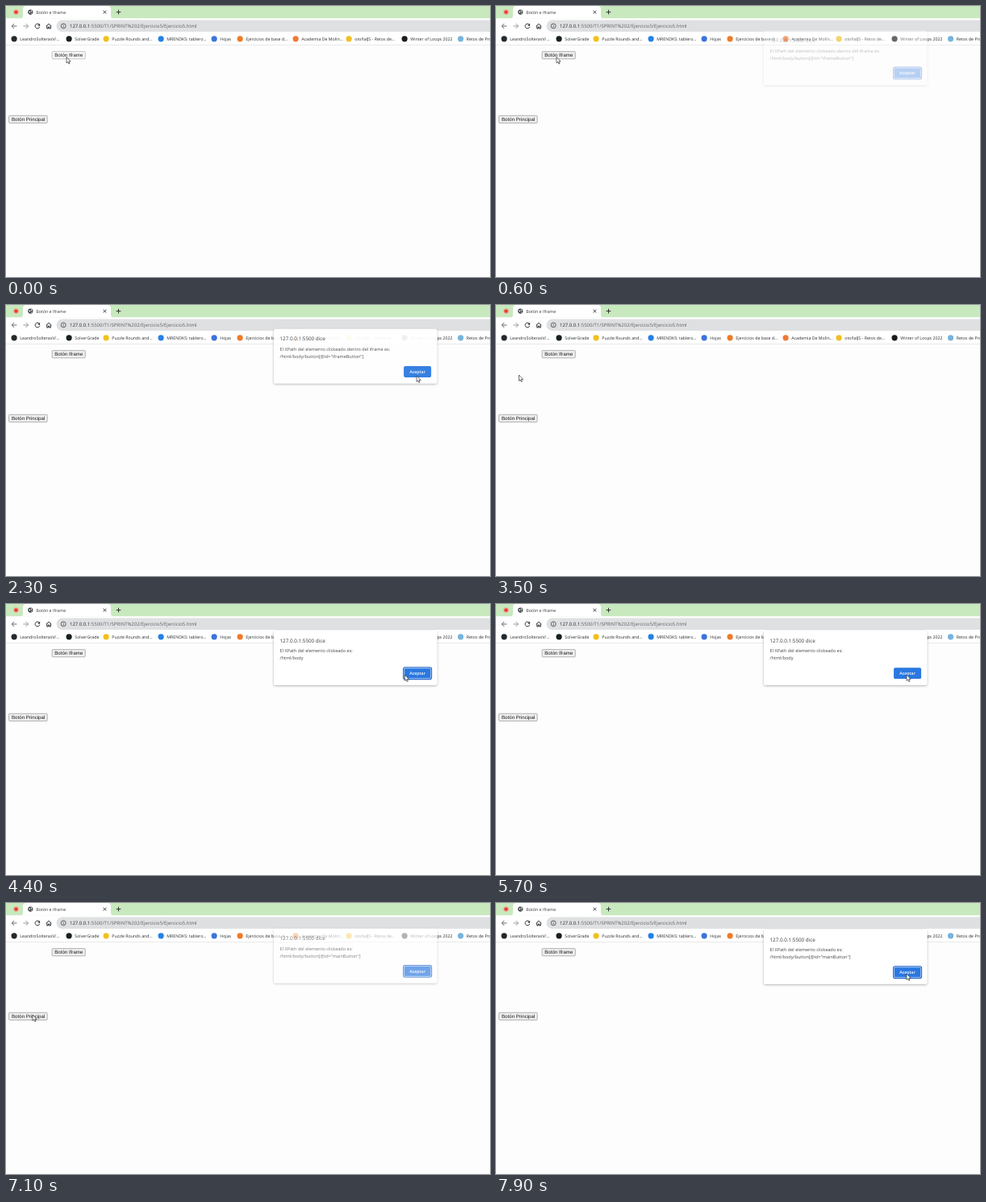
These frames come from a looping animation (600 px wide and 337 px high, 8000 ms). An HTML page:

```html
<!DOCTYPE html>
<html lang="es">
<head>
<meta charset="utf-8">
<title>Botón e Iframe</title>
<style>
html, body { margin: 0; width: 100%; height: 100%; overflow: hidden; background: #fefdfe; }
svg { display: block; width: 100vw; height: 100vh; }
text { font-family: "Open Sans", "Noto Sans", sans-serif; fill: #34373a; white-space: pre; text-rendering: geometricPrecision; }
.mark { font-size: 5.25px; fill: #26292c; }
.body { font-size: 5.55px; fill: #404347; }
.native text { font: 6.15px "Liberation Sans", Arial, sans-serif; fill: #1c1c1c; }
.native rect { fill: #efefef; stroke: #7c7c7c; stroke-width: .55; }
.native .lit { fill: #f7f7f7; stroke: #9a9a9a; }
.line { fill: none; stroke: #2e3134; stroke-width: 1; }
</style>
</head>
<body>
<svg viewBox="0 0 600 337">
  <defs>
    <filter id="shadow" x="-10%" y="-20%" width="120%" height="150%">
      <feDropShadow dx="0" dy="1" stdDeviation="1.5" flood-color="#000" flood-opacity=".32"/>
    </filter>
  </defs>
  <rect width="600" height="337" fill="#fefdfe"/>

  <!-- tab strip -->
  <rect width="600" height="15.5" fill="#c8e8bd"/>
  <path d="M17 15.5Q21 15.5 21 12V4Q21 0 25 0H126Q130 0 130 4V12Q130 15.5 134 15.5Z" fill="#fff"/>
  <circle cx="12.5" cy="7.6" r="3.3" fill="#f0a797"/>
  <circle cx="12.5" cy="7.6" r="2.2" fill="#e5402f"/>
  <circle cx="30.3" cy="7.6" r="3.1" fill="#3c4043"/>
  <path d="M28.2 6.3l1.7.4.3 1.2-1 1zM31 5.3l1.6 1-.8 1.2-1.2-.7zM31 8.4l1.5.2-1.2 1.4z" fill="#fff"/>
  <text x="37.3" y="9.6" font-size="5.3">Botón e Iframe</text>
  <path class="line" d="M120.7 5.8l3.6 3.6m0-3.6l-3.6 3.6"/>
  <path class="line" d="M136.7 7.6h5.6m-2.8-2.8v5.6"/>

  <!-- toolbar -->
  <rect y="15.5" width="600" height="33" fill="#fff"/>
  <path class="line" d="M13.4 25H7.2m3-3l-3 3 3 3" style="stroke:#66696c"/>
  <path class="line" d="M21.4 25h6.2m-3-3l3 3-3 3" style="stroke:#97999c"/>
  <path class="line" d="M41.2 23.1A2.9 2.9 0 1 0 41.8 25.8"/>
  <path d="M42.1 21.7v3h-3z" fill="#2e3134"/>
  <path class="line" d="M49.8 25.2L53 22.2l3.2 3M50.8 24.6v3.5h1.5v-2h1.5v2h1.5v-3.5"/>
  <rect x="62.5" y="17.5" width="560" height="14.6" rx="7.3" fill="#dfe0e2"/>
  <circle class="line" cx="71.2" cy="24.9" r="3" style="stroke-width:.7"/>
  <path class="line" d="M71.2 24.4v2.2m0-3.5v.7" style="stroke-width:.7"/>
  <text x="79" y="27.1" font-size="5.96" style="fill:#5c6064"><tspan fill="#222528">127.0.0.1</tspan>:5500/T1/SPRINT%202/Ejercicio5/Ejercicio5.html</text>
  <g id="marks"></g>
  <rect y="48.3" width="600" height=".7" fill="#e0e1e2"/>

  <!-- page -->
  <g class="native">
    <rect id="frameButton" x="57.1" y="56.6" width="41.2" height="9.2" rx="1"/>
    <text x="60.2" y="63.3">Botón Iframe</text>
    <rect x="3.6" y="136.3" width="47.6" height="9.2" rx="1"/>
    <text x="7" y="143">Botón Principal</text>
  </g>

  <!-- alert -->
  <g id="alert">
    <rect x="332" y="33" width="202.3" height="67.8" rx="2" fill="#fff" filter="url(#shadow)"/>
    <text x="339.5" y="47.5" font-size="6.3">127.0.0.1:5500 dice</text>
    <text class="body" id="line1" x="339.5" y="60.4"></text>
    <text class="body" id="line2" x="339.5" y="69.3"></text>
    <rect x="493.1" y="79.3" width="34" height="13.8" rx="1.9" fill="#2a78e0"/>
    <g id="ring" fill="none">
      <rect x="492.6" y="78.8" width="35" height="14.8" rx="2.2" stroke="#2368c9" stroke-width="1.1"/>
      <rect x="493.6" y="79.8" width="33" height="12.8" rx="1.5" stroke="#cfe0fa" stroke-width=".7"/>
    </g>
    <text x="500.2" y="88" font-size="5.25" font-weight="600" style="fill:#fff">Aceptar</text>
  </g>

  <path id="cursor" d="M0 0V7.4L1.7 5.9 2.8 8.5 4 8 2.9 5.5H5.2Z" fill="#fff" stroke="#222" stroke-width=".65" stroke-linejoin="round"/>
</svg>
<script>
const LOOP = 8000, STEP = 100, FADE = 300;
const $ = id => document.getElementById(id);
const clamp = v => Math.min(1, Math.max(0, v));
const smooth = v => v * v * (3 - 2 * v);

// bookmarks: left edge, icon colour, label
const marks = [
  [6.5, "#24292e", "LeandroSolterasV/..."],
  [74.5, "#16211c", "SolverGrade"],
  [120.5, "#f2c01d", "Puzzle Rounds and..."],
  [188.5, "#2381e6", "MRENDKS: tablero..."],
  [254.5, "#3c73dc", "Hojas"],
  [286.5, "#f07a26", "Ejercicios de base d..."],
  [355.5, "#ee7a35", "Academia De Molin..."],
  [421.5, "#efbf22", "otoñalJS - Retos de..."],
  [490.5, "#1b1b1f", "Winter of Loops 2022"],
  [560, "#77b3dc", "Retos de Program..."]
];
$("marks").innerHTML = marks.map(([x, color, label]) =>
  `<circle cx="${x + 3.6}" cy="40.8" r="3.6" fill="${color}"/>` +
  `<text class="mark" x="${x + 10.8}" y="42.7">${label}</text>`).join("");

// places the pointer visits
const frameButton = { x: 75, y: 63.5 };
const accept = { x: 509, y: 88 };
const blank = { x: 28.5, y: 87 };
const rest = { x: 65, y: 123 };
const mainButton = { x: 33, y: 139 };

const moves = [
  { from: 900, to: 1600, place: accept },
  { from: 2300, to: 3100, place: blank },
  { from: 3800, to: 4470, place: accept },
  { from: 5800, to: 6400, place: rest },
  { from: 6500, to: 6700, place: mainButton },
  { from: 7100, to: 7700, place: accept }
];

const alerts = [
  { open: 600, close: 2200, text: ["El XPath del elemento clickeado dentro del iframe es:", '/html/body/button[@id="iframeButton"]'] },
  { open: 3700, close: 5700, text: ["El XPath del elemento clickeado es:", "/html/body"] },
  { open: 7000, close: LOOP, text: ["El XPath del elemento clickeado es:", '/html/body/button[@id="mainButton"]'] }
];

function pointer(t) {
  return moves.reduce((p, { from, to, place }) => {
    const k = smooth(clamp((t - from) / (to - from)));
    return { x: p.x + (place.x - p.x) * k, y: p.y + (place.y - p.y) * k };
  }, frameButton);
}

function drawAlert(t) {
  const alert = alerts.find(a => t >= a.open && t < a.close + FADE);
  $("alert").style.display = alert ? "" : "none";
  if (!alert) return;
  const shown = clamp((t - alert.open + STEP) / FADE);
  const gone = clamp((t - alert.close) / FADE);
  const lift = 4 * (1 - shown) + 4 * (1 - (1 - gone) ** 4);
  $("alert").setAttribute("opacity", shown * (1 - gone ** 2.5));
  $("alert").setAttribute("transform", `translate(0 ${-lift})`);
  $("ring").style.display = t >= alert.close ? "none" : "";
  $("line1").textContent = alert.text[0];
  $("line2").textContent = alert.text[1];
}

function draw(t) {
  const { x, y } = pointer(t);
  $("cursor").setAttribute("transform", `translate(${x} ${y})`);
  $("frameButton").classList.toggle("lit", t < alerts[0].open);
  drawAlert(t);
}

const start = performance.now();
function tick() {
  const t = (performance.now() - start) % LOOP;
  draw(Math.floor(t / STEP) * STEP);
  requestAnimationFrame(tick);
}
tick();
</script>
</body>
</html>
```
